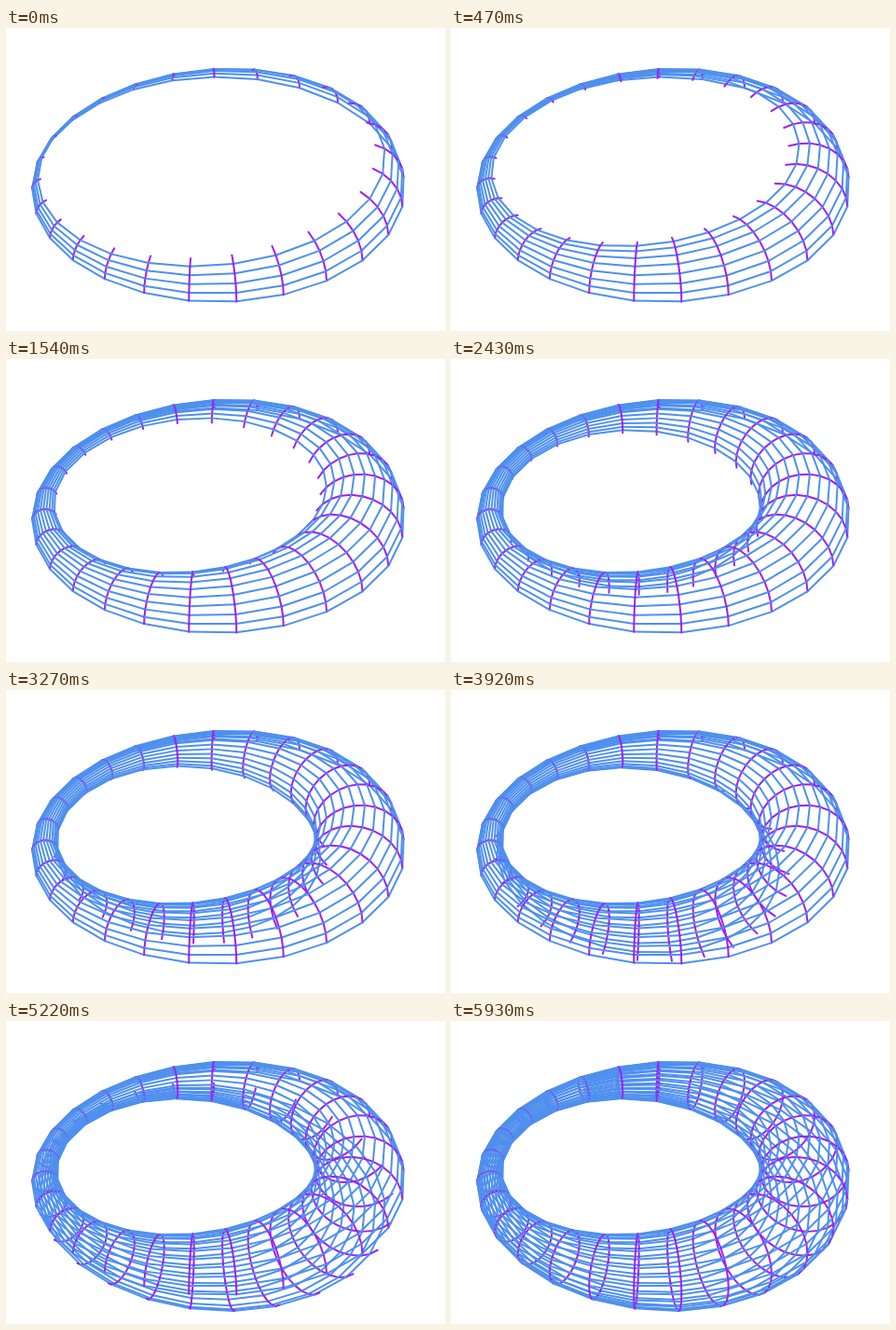
Animation of 471x325 px, one loop 8 s. Source, as an HTML page with a canvas:

```html
<!DOCTYPE html>
<html lang="en">
<head>
<meta charset="utf-8">
<title>Tapered torus</title>
<style>
  html, body { margin: 0; width: 100%; height: 100%; overflow: hidden; background: #fff; }
  canvas { display: block; width: 471px; height: 325px; }
</style>
</head>
<body>
<canvas id="stage" width="471" height="325"></canvas>
<script>
const ctx = document.getElementById('stage').getContext('2d');
const LOOP = 8000, N = 26, START = 5, STEP = 2 * Math.PI / N;
const RING = 169, TUBE = 30.5, SWELL = 20.5;
const CX = 210.5, CY = 166.7, TURN = 31.6 * Math.PI / 180;
const SIN = 0.603, COS = 0.798;
const BLUE = '#4f90ee', PURPLE = '#a01ff0';

// Each moment adds one more strip around the tube.
const GROW = [180, 420, 470, 1070, 1250, 1540, 1780, 2250, 2430, 2850, 3270,
  3500, 3920, 4150, 4390, 4630, 4800, 5220, 5330, 5570, 5930];

function point(i, j) {
  const w = (i + 0.5) * STEP, v = j * STEP;
  const r = TUBE + SWELL * Math.cos(w);
  const rho = RING + r * Math.cos(v);
  const x = rho * Math.cos(w + TURN), y = rho * Math.sin(w + TURN), z = r * Math.sin(v);
  return { x: CX + x, y: CY + SIN * y - COS * z, depth: COS * y + SIN * z };
}

function segment(p, q, color, level, bias) {
  return { p, q, color, level, depth: (p.depth + q.depth) / 2 + bias };
}

const segments = [];
for (let i = 0; i < N; i++) {
  for (let j = 0; j < N; j++) {
    const p = point(i, j);
    segments.push(segment(p, point(i + 1, j), BLUE, j, 0));
    segments.push(segment(p, point(i, j + 1), PURPLE, j, 4));
  }
}
segments.sort((a, b) => a.depth - b.depth);

function draw(t) {
  const count = START + GROW.filter(g => t >= g).length;
  ctx.fillStyle = '#fff';
  ctx.fillRect(0, 0, 471, 325);
  ctx.lineWidth = 2;
  ctx.lineCap = 'round';
  for (const s of segments) {
    if (s.level >= count) continue;
    ctx.strokeStyle = s.color;
    ctx.beginPath();
    ctx.moveTo(s.p.x, s.p.y);
    ctx.lineTo(s.q.x, s.q.y);
    ctx.stroke();
  }
}

function tick() {
  draw(performance.now() % LOOP);
  requestAnimationFrame(tick);
}
tick();
</script>
</body>
</html>
```
